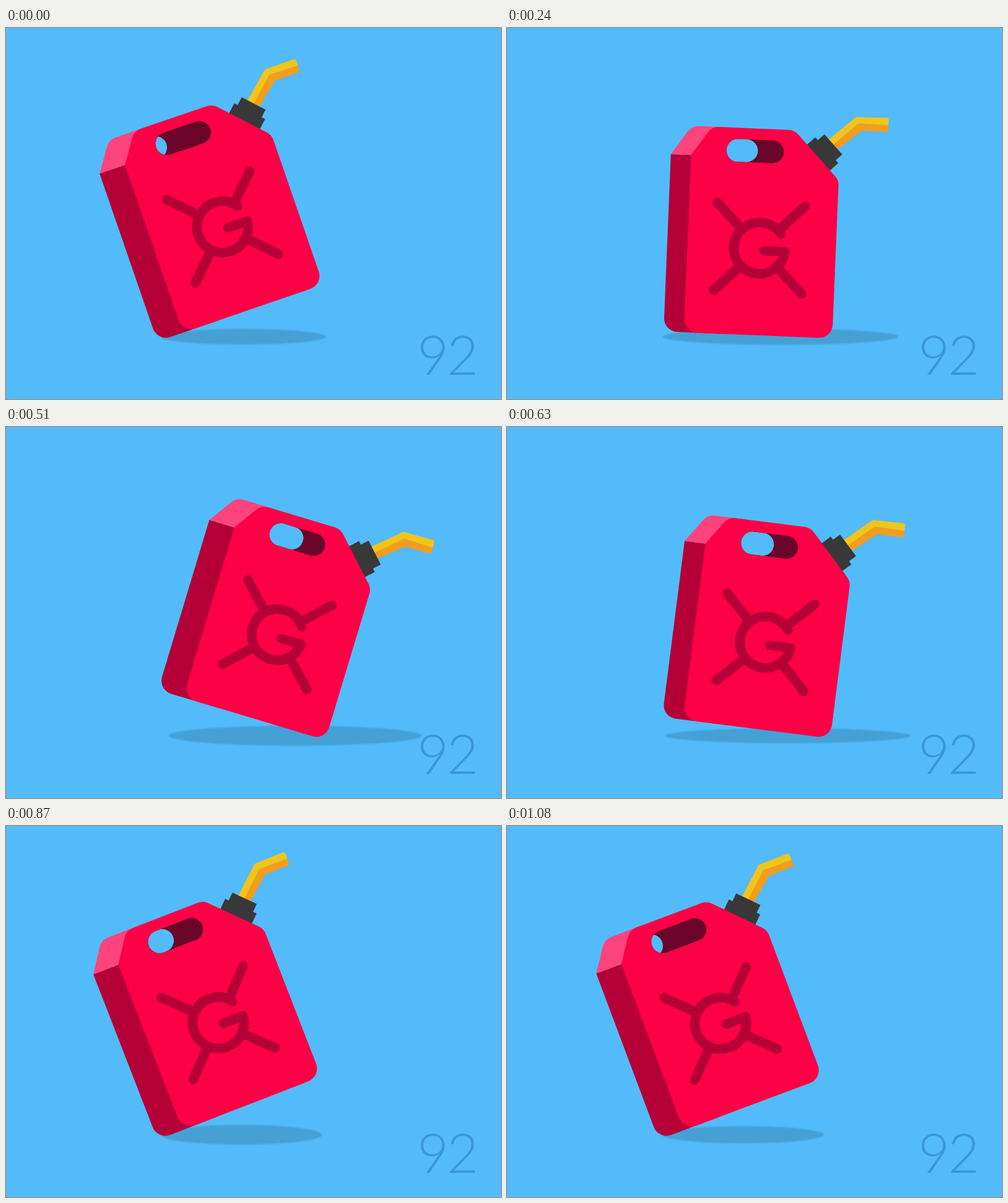
Animation of 800 by 600 pixels, one loop 1110 ms. Source, as an HTML page with a canvas:

```html
<!DOCTYPE html>
<html lang="en">
<head>
<meta charset="utf-8">
<title>Rocking fuel can</title>
<style>
  html, body { margin: 0; width: 100%; height: 100%; overflow: hidden; background: #53bbf9; }
  canvas { display: block; }
</style>
</head>
<body>
<canvas id="stage" width="800" height="600"></canvas>
<script>
const ctx = document.getElementById('stage').getContext('2d');
const { sin, cos, exp, tanh, max, floor, PI } = Math;
const LOOP = 1110, STEP = 30, RAD = PI / 180;
const SKY = '#53bbf9', RED = '#fd0045', DARK = '#b40037', PINK = '#ff447d',
      HOLE = '#6a0429', CAP = '#383838', YELLOW = '#f1c519', ORANGE = '#f39d1f',
      SHADE = '#45a0d6', DIGITS = '#3a97d6';

// Smooth periodic curve through [time, value] keys
function curve(keys) {
  const n = keys.length;
  const key = i => {
    const [t, v] = keys[(i + n) % n];
    return [t + floor(i / n) * LOOP, v];
  };
  const slope = i => {
    const [[a, p], [b, q], [c, r]] = [key(i - 1), key(i), key(i + 1)];
    const before = b - a, after = c - b;
    return ((q - p) / before * after + (r - q) / after * before) / (before + after);
  };
  return t => {
    let i = n - 1;
    while (keys[i][0] > t) i--;
    const [a, p] = key(i), [b, q] = key(i + 1);
    const h = b - a, x = (t - a) / h, y = 1 - x;
    return y * y * ((1 + 2 * x) * p + x * h * slope(i)) +
           x * x * ((1 + 2 * y) * q - y * h * slope(i + 1));
  };
}

// The rocking angle in degrees; the other motions follow it or the loop phase
const tilt = curve([[0, -19], [240, 2.35], [390, 14.8], [480, 17.4],
  [630, 7.26], [750, -11], [870, -21.2], [970, -23.6]]);
// Visible width of the side wall, narrowest when the can is nearly upright
const depth = angle => 43.3 - 11 * exp(-(((angle - 4) / 8.5) ** 2));
// How far the see-through part of the handle reaches
const opening = phase => 6.3 - 18.3 * cos(phase) + 4.4 * sin(phase) - 7.5 * cos(2 * phase);

// Closed polygon of [x, y, cornerRadius]
function poly(color, points) {
  const n = points.length, [x0, y0] = points[0], [x1, y1] = points[n - 1];
  ctx.beginPath();
  ctx.moveTo((x0 + x1) / 2, (y0 + y1) / 2);
  points.forEach(([x, y, r = 0], i) => {
    const [nx, ny] = points[(i + 1) % n];
    ctx.arcTo(x, y, nx, ny, r);
  });
  ctx.closePath();
  ctx.fillStyle = color;
  ctx.fill();
}

function pill(x1, x2, y, r) {
  ctx.beginPath();
  ctx.arc(x1, y, r, PI / 2, PI * 1.5);
  ctx.arc(x2, y, r, -PI / 2, PI / 2);
  ctx.closePath();
}

function drawShadow(angle, phase) {
  const left = 250 + 0.8 * max(0, angle);
  const right = 584 + 96 * tanh((angle + 6) / 15);
  const height = 14.2 - cos(phase) + 3.5 * cos(2 * phase - 4.53);
  ctx.save();
  ctx.filter = 'blur(1px)';
  ctx.fillStyle = SHADE;
  ctx.beginPath();
  ctx.ellipse((left + right) / 2, 499.3, (right - left) / 2, height, 0, 0, 2 * PI);
  ctx.fill();
  ctx.restore();
}

function drawHandle(phase) {
  const left = 75.5, right = 131, y = -297.5, r = 18.5;
  ctx.save();
  pill(left, right, y, r);
  ctx.fillStyle = HOLE;
  ctx.fill();
  ctx.clip();
  const end = left + opening(phase);
  pill(end - 56, end, y, r);
  ctx.fillStyle = SKY;
  ctx.fill();
  ctx.restore();
}

function drawSpout() {
  ctx.save();
  ctx.translate(205.9, -291.2);
  ctx.rotate(46.2 * RAD);
  poly(ORANGE, [[-2, -28], [1.3, -84.7], [35.5, -119.5], [43.3, -112, 3], [13.8, -80.5], [10.5, -28]]);
  poly(YELLOW, [[-11, -28], [-9, -89, 4], [27, -127.5, 3], [35.5, -119.5], [1.3, -84.7], [0, -28]]);
  ctx.fillStyle = CAP;
  ctx.fillRect(-28, -18, 56, 20);
  ctx.fillRect(-21.7, -32, 43.4, 20);
  ctx.restore();
}

function drawEmblem() {
  const ring = 41.5, bar = 4;
  ctx.save();
  ctx.translate(116.5, -141);
  ctx.strokeStyle = DARK;
  ctx.lineWidth = 15.5;
  ctx.lineCap = ctx.lineJoin = 'round';
  ctx.beginPath();
  for (const x of [-1, 1]) for (const y of [-1, 1]) {
    ctx.moveTo(x * 30, y * 30);
    ctx.lineTo(x * 71, y * 71);
  }
  ctx.moveTo(8, bar);
  ctx.arc(0, 0, ring, Math.asin(bar / ring), 324.5 * RAD);
  ctx.stroke();
  ctx.restore();
}

function drawCan(angle, phase) {
  const s = depth(angle), r = 22, width = 240;
  ctx.save();
  // Roll on whichever bottom corner touches the ground
  const [x, corner] = angle < 0
    ? [309 + r * angle * RAD - s, r - s]
    : [505 - 0.22 * angle, width - r];
  ctx.translate(x, 479);
  ctx.rotate(angle * RAD);
  ctx.translate(-corner, r);
  drawSpout();
  poly(DARK, [[60, 0], [-s, 0, r], [-s, -287], [60, -287]]);
  poly(PINK, [[-s, -287], [32 - s, -334, r], [60, -334], [60, -287]]);
  poly(RED, [[120, 0], [0, 0, r], [0, -287], [32, -334, r], [165, -334, r],
    [width, -256, r], [width, 0, r]]);
  drawHandle(phase);
  drawEmblem();
  ctx.restore();
}

function drawNumber() {
  ctx.fillStyle = DIGITS;
  ctx.font = '300 88px Lato, sans-serif';
  ctx.letterSpacing = '-3px';
  ctx.fillText('92', 664.5, 561);
}

function frame(now) {
  const t = floor(now % LOOP / STEP) * STEP;
  const angle = tilt(t), phase = 2 * PI * t / LOOP;
  ctx.fillStyle = SKY;
  ctx.fillRect(0, 0, 800, 600);
  drawNumber();
  drawShadow(angle, phase);
  drawCan(angle, phase);
}

const begin = performance.now();
function tick() {
  frame(performance.now() - begin);
  requestAnimationFrame(tick);
}
tick();
</script>
</body>
</html>
```
